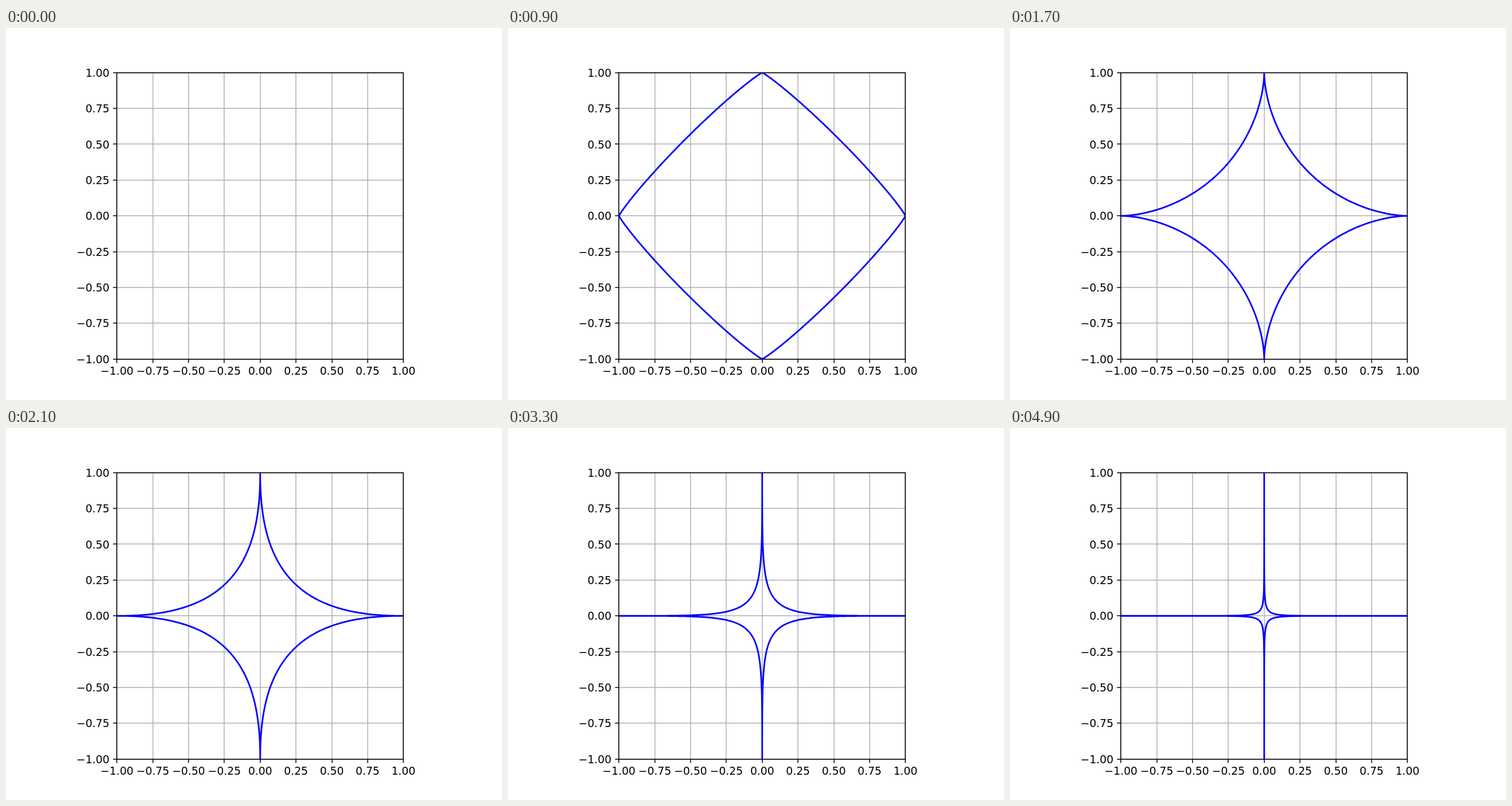
Write an HTML page that moves like this. It is 864x648 px and loops after 5 s.

```html
<!DOCTYPE html>
<html lang="en">
<head>
<meta charset="utf-8">
<title>Superellipse</title>
<style>
  html, body { margin: 0; width: 100%; height: 100%; overflow: hidden; background: #fff; }
  svg { display: block; width: 864px; height: 648px; }
  text { font: 18.75px "DejaVu Sans", sans-serif; fill: #000; }
  path, rect { fill: none; stroke-width: 1.5; }
  #grid { stroke: #b0b0b0; }
  #ticks, #frame { stroke: #000; }
  #curve { stroke: #00f; stroke-width: 2.8125; stroke-linejoin: round; }
</style>
</head>
<body>
<svg viewBox="0 0 864 648">
  <clipPath id="area"><rect x="193" y="78" width="499" height="499"/></clipPath>
  <path id="grid"/>
  <path id="curve" clip-path="url(#area)"/>
  <path id="ticks"/>
  <rect id="frame" x="193" y="78" width="499" height="499"/>
  <g id="labels"></g>
</svg>
<script>
  const CX = 442.8, CY = 327.24, R = 249.48;
  const STEP_MS = 100, STEPS = 50, POINTS = 800;
  const $ = id => document.getElementById(id);
  const px = x => CX + R * x;
  const py = y => CY - R * y;

  function label(str, x, y, anchor) {
    const t = document.createElementNS("http://www.w3.org/2000/svg", "text");
    t.setAttribute("x", x);
    t.setAttribute("y", y);
    t.setAttribute("text-anchor", anchor);
    t.textContent = str;
    $("labels").append(t);
  }

  function drawAxes() {
    let grid = "", ticks = "";
    for (let i = -4; i <= 4; i++) {
      const v = i / 4;
      const x = Math.round(px(v));
      const y = 648 - Math.floor(648 - py(v) + 0.501);
      const str = (v < 0 ? "\u2212" : "") + Math.abs(v).toFixed(2);
      grid += `M${x} 78V577M193 ${y}H692`;
      ticks += `M${x} 577v6.56M193 ${y}h-6.56`;
      label(str, px(v), 604.3, "middle");
      label(str, 180.2, Math.round(py(v) + 7), "end");
    }
    $("grid").setAttribute("d", grid);
    $("ticks").setAttribute("d", ticks);
  }

  const power = (v, a) => Math.sign(v) * Math.abs(v) ** a;

  // x = cos^a, y = sin^a, with signs kept
  function curve(a) {
    if (!a) return "";
    const pts = [];
    for (let i = 0; i < POINTS; i++) {
      const q = 2 * Math.PI * i / POINTS;
      const x = px(power(Math.cos(q), a)), y = py(power(Math.sin(q), a));
      pts.push(x.toFixed(2) + " " + y.toFixed(2));
    }
    return "M" + pts.join("L") + "Z";
  }

  let shown = -1;
  function tick(now) {
    const step = Math.floor(now / STEP_MS) % STEPS;
    if (step !== shown) {
      shown = step;
      $("curve").setAttribute("d", curve(step * 0.2));
    }
    requestAnimationFrame(tick);
  }

  drawAxes();
  requestAnimationFrame(tick);
</script>
</body>
</html>
```
